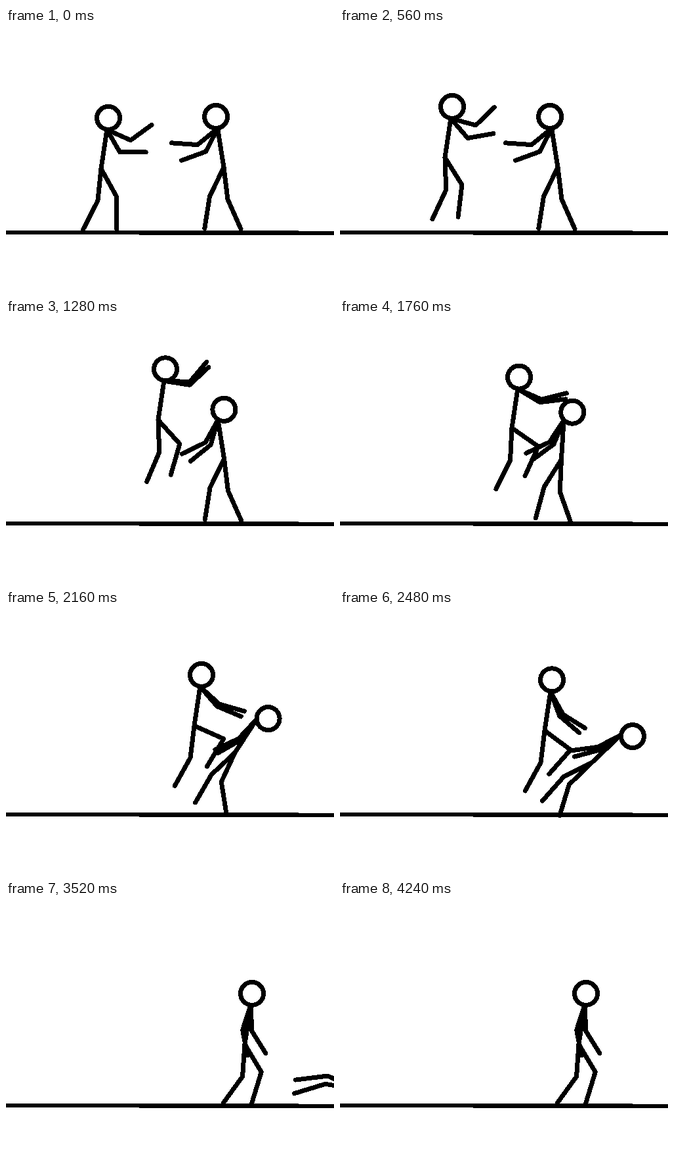
An HTML page that plays this animation: 500x400 px, repeating every 4400 ms.

```html
<!DOCTYPE html>
<html lang="en">
<head>
<meta charset="utf-8">
<title>Stick fight</title>
<style>
  html, body { margin: 0; width: 100%; height: 100%; overflow: hidden; background: #fff; }
  svg { display: block; width: 500px; height: 400px; shape-rendering: crispEdges; }
  .limbs { fill: none; stroke: #000; stroke-width: 7; stroke-linecap: round; stroke-linejoin: round; }
  .head { fill: #fff; stroke: #000; stroke-width: 7; }
</style>
</head>
<body>
<svg id="stage" viewBox="0 0 500 400">
  <rect x="0" y="308" width="446" height="6"/>
  <rect x="203" y="309" width="297" height="6"/>
</svg>
<script>
const LOOP = 4400, STEP = 80, LAST = 52;
const TORSO = 60, NECK = 18, ARM = 39.5, LEG = 49;

// Poses in degrees. body: torso, head. arms: upper, lower, offset of the second arm.
// legs: thigh and shin of each leg. "sag" bows the path of the hip on the way
// to a pose (negative is up) and "ease" is the power of the easing curve.
const upright = [-81.5, -83];
const stance = { at: 0, hip: [145, 214], body: upright, arms: [24, -36, 36], legs: [61, 90, 96, 117] };
const attack = [
  stance,
  { ...stance, at: 3, hip: [142, 220] },
  { at: 6, hip: [160, 197], body: upright, arms: [15, -44, 34], legs: [58, 97, 88, 115] },
  { at: 15, hip: [232, 153.5], body: upright, arms: [2, -50, 7], legs: [48, 106, 88, 113], sag: -13 },
  { at: 26, hip: [287, 176], body: upright, arms: [42, 16, 7], legs: [24, 121, 97, 119] },
  { at: 34, hip: [337, 209], body: upright, arms: [80, 48, 10], legs: [49, 142, 97, 119], sag: -9 },
  { at: 42, hip: [364, 218], body: upright, arms: [87, 58, 21], legs: [59, 107, 94, 126], sag: 10 }
];

const guard = { at: 8, hip: [332, 212], body: [-99, -98], arms: [141, 184, -24], legs: [116, 99, 83, 66] };
const lying = { at: 43, hip: [535, 286], body: [0, 40], arms: [190, 195, -10], legs: [204, 173, 189, 163] };
const defence = [
  guard,
  { ...guard, at: 15, hip: [332.5, 212.5], body: [-99, -59], arms: [119, 154, -13] },
  { at: 26, hip: [349, 217], body: [-57, -5], arms: [133, 155, -5], legs: [137, 120, 115, 81], ease: 2 },
  { at: 34, hip: [420, 246], body: [-30, 17], arms: [172, 190, -10], legs: [169, 143, 157, 133] },
  lying,
  { ...lying, at: LAST, hip: [604, 292] }
];

function poseAt(keys, step) {
  const next = keys.find(key => key.at > step);
  if (!next) return keys[keys.length - 1];
  const last = keys[keys.indexOf(next) - 1];
  if (!last) return next;
  const progress = (step - last.at) / (next.at - last.at);
  const mix = progress ** (next.ease || 1);
  const pose = {};
  for (const part of ["hip", "body", "arms", "legs"]) {
    pose[part] = last[part].map((value, i) => value + (next[part][i] - value) * mix);
  }
  pose.hip[1] += (next.sag || 0) * Math.sin(Math.PI * progress);
  return pose;
}

function reach([x, y], degrees, length) {
  const angle = degrees * Math.PI / 180;
  return [x + Math.cos(angle) * length, y + Math.sin(angle) * length];
}

function limb(root, upper, lower, length) {
  const joint = reach(root, upper, length);
  return "M" + [root, joint, reach(joint, lower, length)].join("L");
}

function addShape(tag, className) {
  const node = document.createElementNS("http://www.w3.org/2000/svg", tag);
  node.setAttribute("class", className);
  return document.getElementById("stage").appendChild(node);
}

const figures = [defence, attack].map(keys => {
  const head = addShape("circle", "head");
  head.setAttribute("r", 17.5);
  return { keys, head, limbs: addShape("path", "limbs") };
});

function drawFigure({ keys, head, limbs }, step) {
  const { hip, body: [torso, tilt], arms: [upper, lower, offset], legs } = poseAt(keys, step);
  const neck = reach(hip, torso, TORSO);
  const [x, y] = reach(neck, tilt, NECK);
  head.setAttribute("cx", x);
  head.setAttribute("cy", y);
  limbs.setAttribute("d", "M" + hip + "L" + neck +
    limb(neck, upper, lower, ARM) + limb(neck, upper + offset, lower + offset, ARM) +
    limb(hip, legs[0], legs[1], LEG) + limb(hip, legs[2], legs[3], LEG));
}

function render(time) {
  // The opening and closing poses each hold for two steps.
  const step = Math.min(LAST, Math.max(0, Math.floor(time % LOOP / STEP) - 1));
  figures.forEach(figure => drawFigure(figure, step));
}

const start = performance.now();
function tick() {
  render(performance.now() - start);
  requestAnimationFrame(tick);
}
tick();
</script>
</body>
</html>
```
